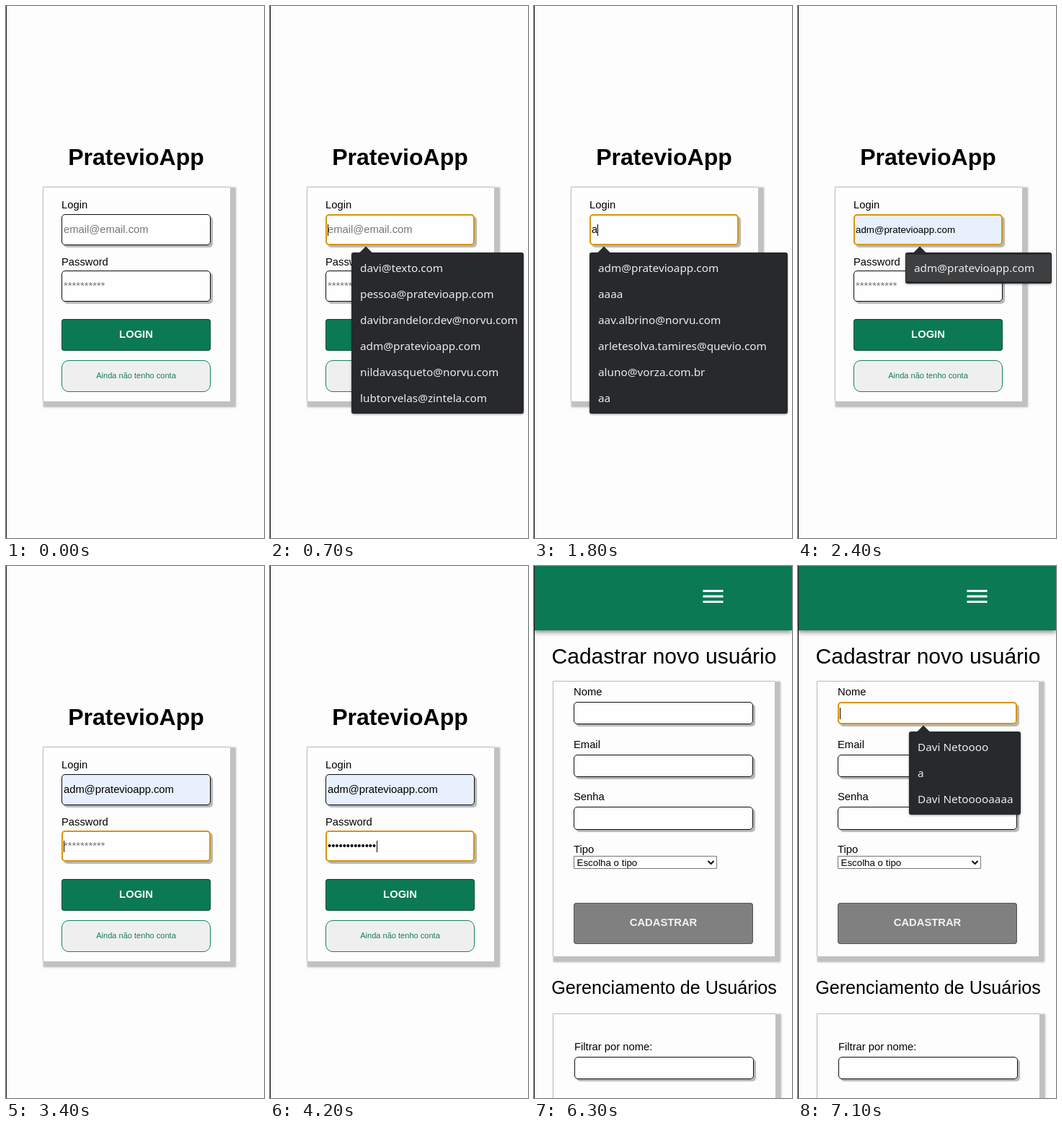
Write an HTML page with a canvas that moves like this. It is 358 by 736 pixels and loops after 8000 ms.

```html
<!DOCTYPE html>
<html lang="pt-BR">
<head>
<meta charset="utf-8">
<title>PratevioApp</title>
<style>
html, body { margin: 0; width: 100%; height: 100%; overflow: hidden; background: #fdfdfd; }
canvas { display: block; width: 358px; height: 736px; }
</style>
</head>
<body>
<canvas id="stage"></canvas>
<script>
const W = 358, H = 736, LOOP = 8000;
const SANS = '"Liberation Sans", Arial, sans-serif';
const MENU = '"Noto Sans", "Open Sans", sans-serif';
const GREEN = '#0b7a54', ORANGE = '#d6960a', HINT = '#777777', FILLED = '#e7f0fc';
const BODY = 14.77;
const ADMIN = 'adm@pratevioapp.com';

const RECENT = [
  'davi@texto.com', 'pessoa@pratevioapp.com', 'davibrandelor.dev@norvu.com',
  ADMIN, 'nildavasqueto@norvu.com', 'lubtorvelas@zintela.com'
];
const MATCHES = [
  ADMIN, 'aaaa', 'aav.albrino@norvu.com',
  'arletesolva.tamires@quevio.com', 'aluno@vorza.com.br', 'aa'
];
const NAMES = ['Davi Netoooo', 'a', 'Davi Netooooaaaa'];

// Event times in ms
const T = {
  focus: 100, menu: 700, typeA: 1600, typeD: 2000, hover: 2300, pick: 2500,
  password: 3300, paste: 3900, press: 5900, page: 6100, nameFocus: 6800, nameMenu: 7000
};

const canvas = document.getElementById('stage');
const ctx = canvas.getContext('2d');
const dpr = window.devicePixelRatio || 1;
canvas.width = W * dpr;
canvas.height = H * dpr;

function text(str, x, y, { size = BODY, color = '#000', weight = '', align = 'left', font = SANS } = {}) {
  ctx.font = `${weight} ${size}px ${font}`;
  ctx.fillStyle = color;
  ctx.textAlign = align;
  ctx.fillText(str, x, y);
}

function box(x, y, w, h, r, fill, stroke, line = 1) {
  ctx.beginPath();
  ctx.roundRect(x, y, w, h, r);
  ctx.fillStyle = fill;
  ctx.fill();
  if (!stroke) return;
  ctx.shadowColor = 'transparent';
  ctx.beginPath();
  ctx.roundRect(x + line / 2, y + line / 2, w - line, h - line, Math.max(0, r - line / 2));
  ctx.lineWidth = line;
  ctx.strokeStyle = stroke;
  ctx.stroke();
}

function withShadow(dx, dy, blur, color, draw) {
  ctx.save();
  ctx.shadowOffsetX = dx * dpr;
  ctx.shadowOffsetY = dy * dpr;
  ctx.shadowBlur = blur * dpr;
  ctx.shadowColor = color;
  draw();
  ctx.restore();
}

// The shadow is wider than the card, so it reaches the far corners too
function card(x, y, w, h) {
  const shade = '#bfc2c0';
  withShadow(0, 0, 3, shade, () => box(x + 1, y + 1, w + 6.5, h + 6.5, 0, shade));
  box(x, y, w, h, 0, '#fdfdfd');
  ctx.fillStyle = '#b4c5c0';
  ctx.fillRect(x, y, w, 1);
  ctx.fillRect(x, y, 1, h);
}

function field(x, y, w, h, focused, fill = '#fefefe') {
  withShadow(3, 3, 1, 'rgba(0,0,0,.28)', () =>
    box(x, y, w, h, 5, fill, focused ? ORANGE : '#0c0c0c', focused ? 2 : 1));
}

function caret(x, y) {
  ctx.fillStyle = '#000';
  ctx.fillRect(x, y, 1, 16);
}

function menu(x, y, w, rows, hovered) {
  const fill = '#27292c';
  withShadow(0, 1, 3, 'rgba(0,0,0,.4)', () => box(x, y, w, rows.length * 36 + 7, 3, fill));
  ctx.fillStyle = fill;
  ctx.beginPath();
  ctx.moveTo(x + 11, y + 0.5);
  ctx.lineTo(x + 20, y - 8.5);
  ctx.lineTo(x + 29, y + 0.5);
  ctx.fill();
  if (hovered) box(x + 1, y + 3, w - 2, 37, 0, '#3d3f41');
  rows.forEach((row, i) =>
    text(row, x + 12, y + 27 + i * 36, { size: 15.3, color: '#ececec', font: MENU }));
}

function loginButton(pressed) {
  let edge = '#0a4d38';
  if (pressed) {
    edge = ctx.createLinearGradient(170, 433, 175, 477);
    edge.addColorStop(0, '#1c2621');
    edge.addColorStop(0.5, '#33473f');
    edge.addColorStop(1, '#7c8581');
  }
  box(77, 433, 207, 44, 4, GREEN, edge, pressed ? 1.6 : 1);
  text('LOGIN', 180.5, 459, { weight: 'bold', color: '#fff', align: 'center' });
}

function loginValue(t) {
  const y = 314;
  if (t < T.typeA) text('email@email.com', 80, y, { color: HINT });
  else if (t < T.typeD) text('a', 80, y);
  else if (t < T.hover) text('ad', 80, y);
  else if (t < T.pick) text(ADMIN, 80, y, { size: 13.33 });
  else text(ADMIN, 80, y);

  if (t >= T.focus && t < T.typeA) caret(80, 302);
  else if (t >= T.typeA && t < T.typeD) caret(88, 302);
  else if (t >= T.typeD && t < T.hover) caret(96, 302);
}

function loginPage(t) {
  const onLogin = t >= T.focus && t < T.password;
  const onPassword = t >= T.password && t < T.press;

  text('PratevioApp', 180.5, 220, { size: 32, weight: 'bold', align: 'center' });
  card(51, 250, 260, 297);

  text('Login', 77, 279.5);
  field(77, 288, 207, 43, onLogin, t >= T.hover ? FILLED : undefined);
  loginValue(t);

  text('Password', 77, 358.5);
  field(77, 366, 207, 43, onPassword);
  if (t < T.paste) {
    text('*'.repeat(10), 80, 391.5, { color: HINT });
    if (onPassword) caret(80, 380);
  } else {
    text('•'.repeat(13), 80, 392);
    if (onPassword) caret(148, 380);
  }

  loginButton(t >= T.press);
  box(77, 490, 207, 44, 10, '#efefef', '#168264');
  text('Ainda não tenho conta', 180.5, 515, { size: 11.05, color: '#177d61', align: 'center' });

  if (t >= T.menu && t < T.typeA) menu(113, 341, 239, RECENT);
  else if (t >= T.typeA && t < T.typeD) menu(77, 341, 275, MATCHES);
  else if (t >= T.typeD && t < T.pick) menu(149, 341, 203, [ADMIN], t >= T.hover);
}

function typeSelect() {
  box(55, 401, 199, 18, 1, '#fff', '#767676');
  text('Escolha o tipo', 59.5, 414.5, { size: 13.33 });
  ctx.beginPath();
  ctx.moveTo(241.5, 408);
  ctx.lineTo(245.5, 412);
  ctx.lineTo(249.5, 408);
  ctx.lineWidth = 2;
  ctx.strokeStyle = '#111';
  ctx.stroke();
}

function header() {
  withShadow(0, 2, 7, 'rgba(0,0,0,.55)', () => box(0, 0, W, 89, 0, GREEN));
  ctx.fillStyle = '#fff';
  for (const y of [33, 40.5, 48]) ctx.fillRect(234.5, y, 28, 3);
}

function adminPage(t) {
  const focused = t >= T.nameFocus;
  header();

  text('Cadastrar novo usuário', 180.5, 135, { size: 30, align: 'center' });
  card(26, 159, 308, 381);
  text('Nome', 55, 179);
  field(55, 188, 249, 31, focused);
  if (focused) caret(58, 196);
  text('Email', 55, 252);
  field(55, 261, 249, 31);
  text('Senha', 55, 324);
  field(55, 333, 249, 32);
  text('Tipo', 55, 396.5);
  typeSelect();
  box(55, 466, 249, 57, 4, '#808080', '#555');
  text('CADASTRAR', 179.5, 498, { weight: 'bold', color: '#f2f2f2', align: 'center' });

  text('Gerenciamento de Usuários', 180.5, 592, { size: 25.1, align: 'center' });
  card(26, 619, 309, 200);
  text('Filtrar por nome:', 56, 670);
  field(56, 679, 249, 31);

  if (t >= T.nameMenu) menu(154, 229, 155, NAMES);
}

function draw(t) {
  ctx.setTransform(dpr, 0, 0, dpr, 0, 0);
  ctx.fillStyle = '#fdfdfd';
  ctx.fillRect(0, 0, W, H);
  if (t < T.page) loginPage(t);
  else adminPage(t);
  ctx.fillStyle = '#1a1a1a';
  ctx.fillRect(0, 0, 1, H);
}

const start = performance.now();
function tick() {
  draw((performance.now() - start) % LOOP);
  requestAnimationFrame(tick);
}
tick();
</script>
</body>
</html>
```
